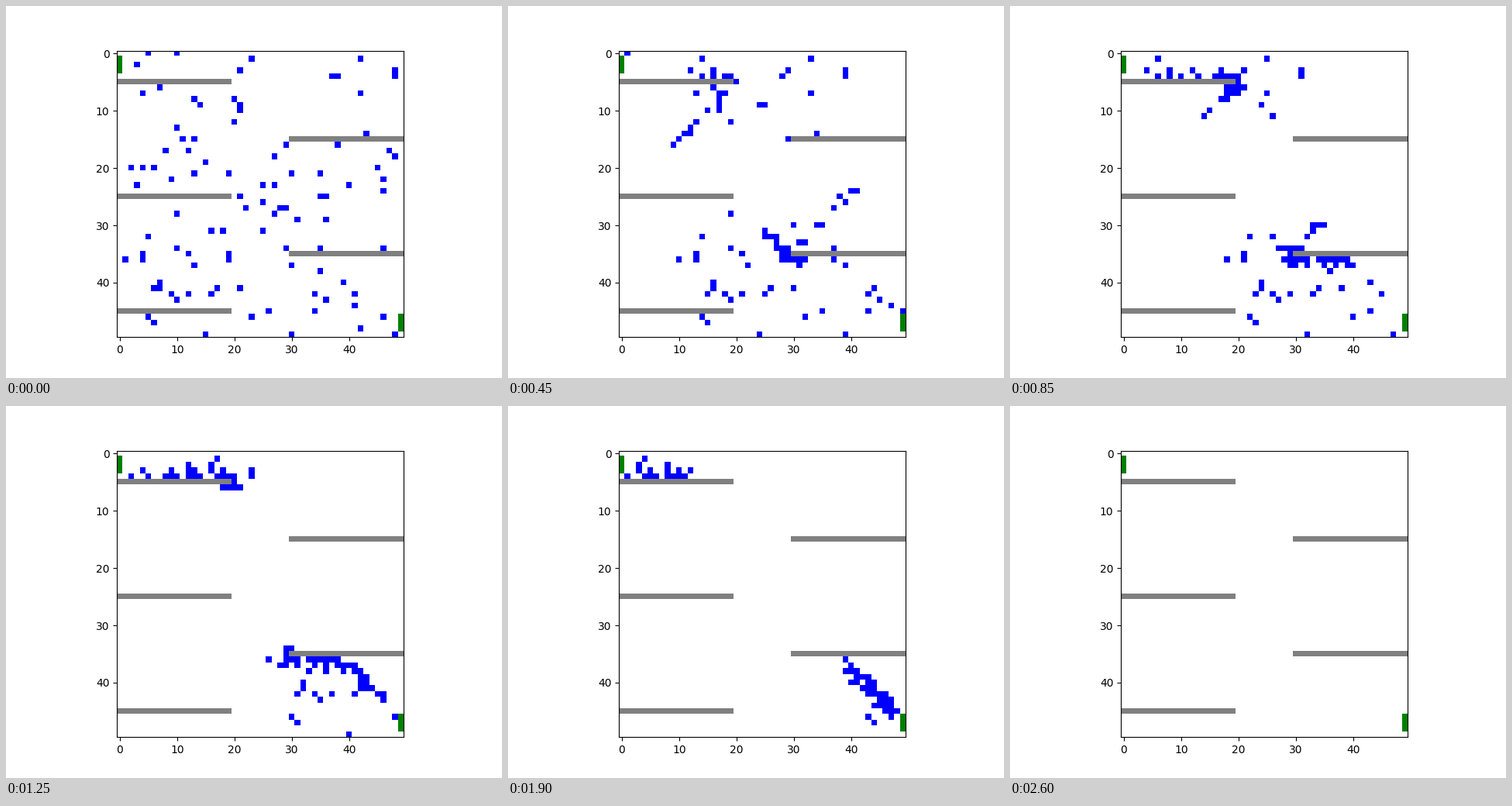
A matplotlib script that plays this animation: 640x480 px, repeating every 2.65 s.

```python
import numpy as np
import matplotlib.pyplot as plt
from matplotlib.animation import FuncAnimation
from matplotlib.colors import ListedColormap

SIZE, FRAMES, INTERVAL = 50, 53, 50
EMPTY, PERSON, WALL, EXIT = range(4)
COLORS = ListedColormap(["white", "blue", "gray", "green"])

# Starting columns of the people in each row of the room.
CROWD = {
    0: (5, 10), 1: (23, 42), 2: (3,), 3: (21, 48), 4: (37, 38, 48),
    6: (7,), 7: (4, 42), 8: (13, 20), 9: (14, 21), 10: (21,),
    12: (20,), 13: (10,), 14: (43,), 15: (11, 13), 16: (29, 38),
    17: (8, 12, 47), 18: (27, 48), 19: (15,), 20: (2, 4, 6, 45),
    21: (13, 19, 30, 35), 22: (9, 46), 23: (3, 25, 27, 40), 24: (46,),
    25: (21, 35, 36), 26: (25,), 27: (22, 28, 29), 28: (10, 27),
    29: (31, 36), 31: (16, 18, 25), 32: (5,), 34: (10, 29, 35, 46),
    35: (4, 12, 19), 36: (1, 4, 19), 37: (13, 30), 38: (35,),
    40: (7, 39), 41: (6, 7, 17, 21), 42: (9, 12, 16, 34, 41),
    43: (10, 36), 44: (41,), 45: (26, 34), 46: (5, 23, 46), 47: (6,),
    48: (42,), 49: (15, 30, 48),
}

MOVES = [(dy, dx, np.hypot(dy, dx))
         for dy in (-1, 0, 1) for dx in (-1, 0, 1) if dy or dx]


def build_room():
    room = np.full((SIZE, SIZE), EMPTY)
    room[5:46:20, :20] = WALL
    room[15:36:20, 30:] = WALL
    room[1:4, 0] = EXIT
    room[46:49, -1] = EXIT
    return room


def exit_distance(room):
    """Walking distance to the nearest exit, with a one-cell solid border."""
    padded = np.pad(room, 1, constant_values=WALL)
    dist = np.where(padded == EXIT, 0.0, np.inf)
    for _ in range(2 * SIZE):
        for dy, dx, cost in MOVES:
            dist = np.minimum(dist, np.roll(dist, (dy, dx), (0, 1)) + cost)
            dist[padded == WALL] = np.inf
    return dist


def choose(cell, dist, before, taken):
    """Shortest way first, then cells that were free, then straight moves."""
    y, x = cell
    options = []
    for dy, dx, cost in MOVES:
        new = (y + dy, x + dx)
        if dist[new] < dist[cell] - 1e-6 and new not in taken:
            total = round(dist[new] + cost, 4)
            options.append((total, new in before, cost, new))
    return min(options)[2:] if options else (1, cell)


def step(people, dist):
    before = {cell for cell, _ in people}
    taken = set(before)
    moved = []
    for cell, debt in sorted(people, key=lambda p: (dist[p[0]], p[0])):
        if debt >= 1:
            # Diagonals are longer, so they cost a pause now and then.
            moved.append((cell, debt - 1))
            continue
        cost, new = choose(cell, dist, before, taken)
        taken.discard(cell)
        if dist[new] > 0:
            taken.add(new)
            moved.append((new, debt + cost - 1))
    return moved


def simulate(room):
    dist = exit_distance(room)
    people = [((y + 1, x + 1), 0.0) for y, cols in CROWD.items() for x in cols]
    history = []
    for _ in range(FRAMES - 1):
        grid = room.copy()
        for (y, x), _ in people:
            grid[y - 1, x - 1] = PERSON
        history.append(grid)
        people = step(people, dist)
    return history + [room]  # everybody is out at the end


history = simulate(build_room())

fig, ax = plt.subplots(figsize=(6.4, 4.8), dpi=100)
image = ax.imshow(history[0], cmap=COLORS, vmin=EMPTY, vmax=EXIT,
                  interpolation="nearest")


def update(i):
    image.set_data(history[i])
    return (image,)


anim = FuncAnimation(fig, update, frames=FRAMES, interval=INTERVAL,
                     repeat=True, repeat_delay=0)
plt.show()
```
